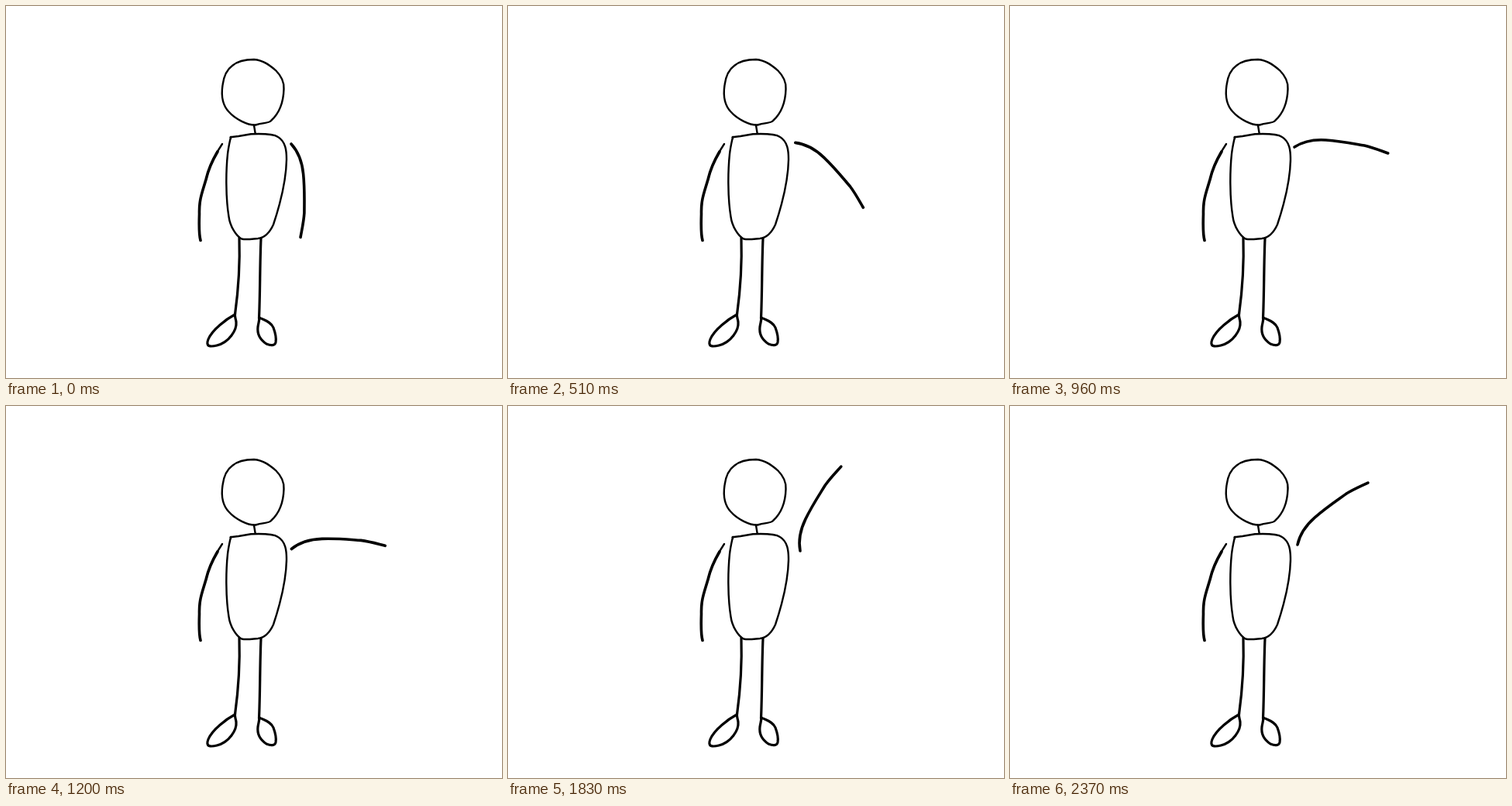
Recreate the animation shown at these times as an HTML page. Size 640 by 480 pixels, loop 2430 ms.

```html
<!DOCTYPE html>
<html lang="en">
<head>
<meta charset="utf-8">
<title>Waving figure</title>
<style>
  html, body { margin: 0; height: 100%; overflow: hidden; background: #fff; }
  svg { display: block; width: 640px; height: 480px; }
  path { fill: none; stroke: #000; stroke-linecap: round; stroke-linejoin: round; }
</style>
</head>
<body>
<svg viewBox="0 0 640 480">
  <g stroke-width="2.4">
    <path style="stroke-width:inherit" d="M320 69C333 70 342 78 348 83C356 91 359 98 358.5 107C358 125 352 139 342 148C338 152 332 150 322 153.5C312 154 296 146 288 137C278 127 278 112 279.5 102C281 90 285 82 292 77C300 70 310 69 320 69Z"/>
    <path d="M320 154L321.7 164.5"/>
    <path d="M290 171L289.5 169.3L300 168L316 165.3C330 164.7 345 165 351 169C361 175 362 187 362 198C361.5 225 354 255 345 282C340 293 334 299 325 300C318 300.5 310 302 304 300.5C297 297 289 284 287.5 272C283 245 284 210 286 191C287 182 289 174 290 169"/>
    <path d="M279 178C270 191 262 207 258 224"/>
  </g>
  <g stroke-width="3.2">
    <path d="M301 299C302 330 300 365 295.5 398"/>
    <path d="M329 300C327.5 335 328 370 326.5 403"/>
    <path d="M295.5 398C284 404 266 418 261 430C257 440 264 440 272 438C288 434 298 418 297 408C296.5 403 295 402 295.5 397"/>
    <path d="M327 402C332 405 342 407 345 415C348 423 349 428 348 434C347 439 341 438 336 436C327 430 324 422 325 414C326 408 327 405 327 402"/>
  </g>
  <g stroke-width="3.6">
    <path d="M273 188C267 198 261 211 258 224C253 241 249 250 249.5 268C249 282 249 295 251 302.5"/>
    <path id="arm" d="M0 0C8 -6 21 -11.7 40 -11.7C60 -11.7 75 -9.5 90 -8C102 -6 112 -2.5 121 0"/>
  </g>
</svg>
<script>
const STEP = 30, LOOP = 2430, LAST = 79;
const arm = document.getElementById('arm');

// step, shoulder x, shoulder y, angle in degrees
const poses = [
  [0, 368, 178, 84.3],
  [10, 380, 169, 74.1],
  [17, 370.8, 176.4, 43.7],
  [24, 369, 179, 25.1],
  [32, 367, 182, 3.8],
  [34, 366.5, 182.8, -2],
  [49, 371, 187, -1.9],
  [59, 378.7, 189, -71],
  [66, 372.7, 182, -46.9],
  [73, 374, 188, -77],
  [79, 371, 179, -41.3]
];

function poseAt(step) {
  const next = Math.max(1, poses.findIndex(p => p[0] >= step));
  const a = poses[next - 1], b = poses[next];
  const k = (step - a[0]) / (b[0] - a[0]);
  return a.map((v, i) => v + (b[i] - v) * k);
}

function draw() {
  const step = Math.min(LAST, Math.floor(performance.now() % LOOP / STEP));
  const [, x, y, angle] = poseAt(step);
  arm.setAttribute('transform', `translate(${x} ${y}) rotate(${angle})`);
  requestAnimationFrame(draw);
}
draw();
</script>
</body>
</html>
```
